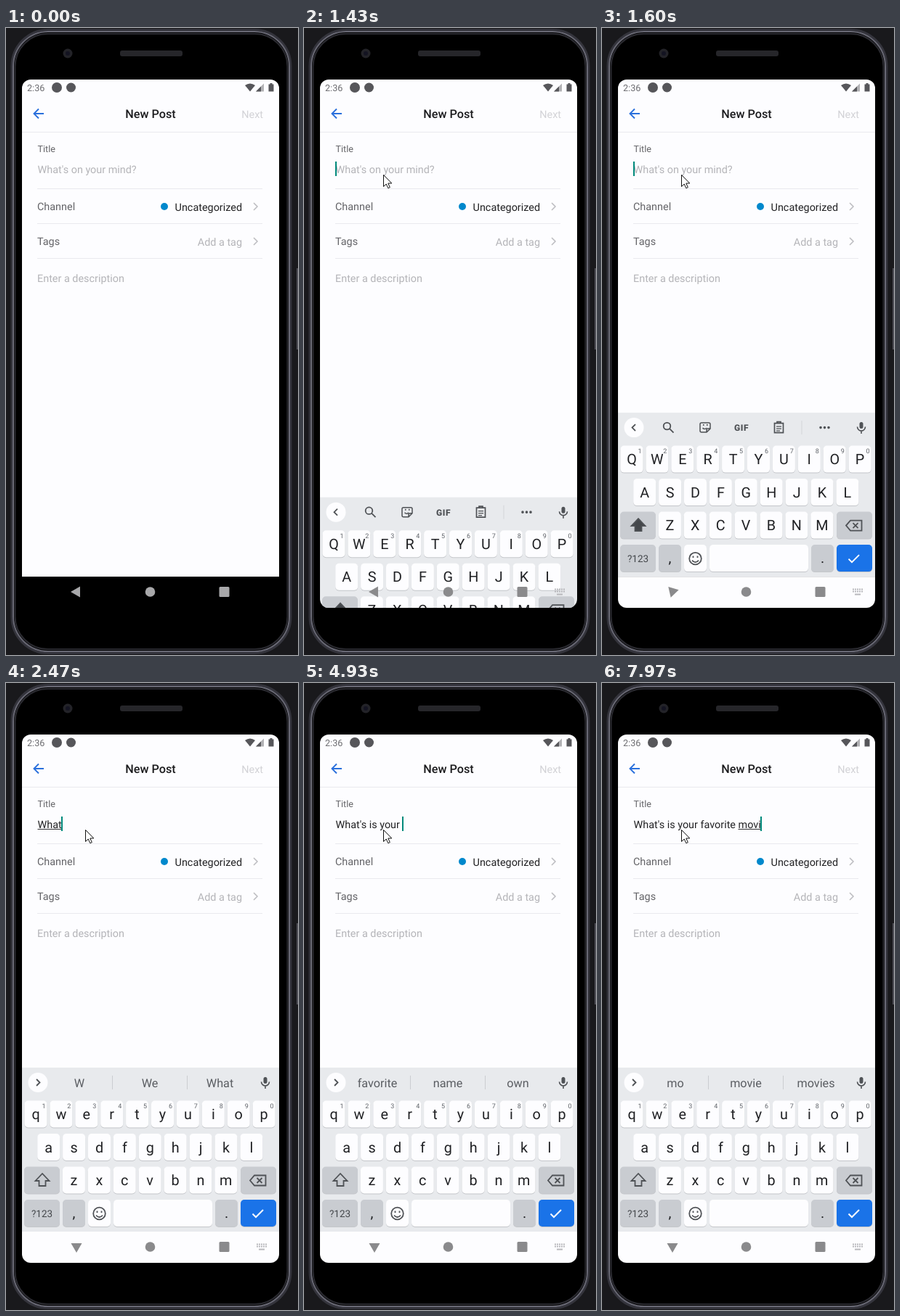
Recreate the animation shown at these times as an HTML page. Size 402x864 px, loop 8 s.

```html
<!DOCTYPE html>
<html lang="en">
<head>
<meta charset="utf-8">
<title>New Post</title>
<style>
  html, body { margin: 0; width: 100%; height: 100%; overflow: hidden; background: #19191c; }
  svg { display: block; width: 100%; height: 100%; font-family: Roboto, sans-serif; }
  text { white-space: pre; text-rendering: geometricPrecision; }
  .body { font-size: 14.4px; fill: #646468; }
  .dark { fill: #222224; }
  .pale { fill: #b4b4b8; }
  .end { text-anchor: end; }
  .mid { text-anchor: middle; }
  .line { fill: none; stroke: #4f5256; stroke-width: 1.8; }
  .letter { font-size: 19.8px; fill: #202124; text-anchor: middle; }
  .digit { font-size: 9px; fill: #5f6368; text-anchor: middle; }
  .guess { font-size: 16.2px; fill: #5a5d62; text-anchor: middle; }
</style>
</head>
<body>
<svg viewBox="0 0 402 864">
  <defs>
    <clipPath id="screen"><rect x="22" y="71" width="354" height="728" rx="12"/></clipPath>
  </defs>

  <!-- phone body -->
  <rect width="402" height="864" fill="#19191c"/>
  <rect x="400" y="331" width="2" height="112" fill="#4c4c54"/>
  <rect x="8" y="2.500" width="384" height="859" rx="50" fill="#000" stroke="#34343c" stroke-width="3"/>
  <rect x="10" y="5" width="380" height="854" rx="48" fill="none" stroke="#686874" stroke-width="2"/>
  <rect x="12.500" y="8" width="375" height="848" rx="45" fill="none" stroke="#2a2a30" stroke-width="2"/>
  <circle cx="85" cy="35" r="6.500" fill="#232328"/>
  <circle cx="85" cy="35" r="3" fill="#141422"/>
  <rect x="157" y="31" width="86" height="8" rx="3" fill="#26262a"/>

  <g clip-path="url(#screen)">
    <rect x="22" y="71" width="354" height="685" fill="#fdfdff"/>

    <!-- status bar -->
    <text x="29" y="86.500" font-size="12.600" fill="#6c6c70">2:36</text>
    <g fill="#56565a">
      <circle cx="70" cy="82" r="7"/>
      <circle cx="89.500" cy="82" r="6.500"/>
      <path d="M329 79q7-5 14 0l-7 8.500z"/>
      <path d="M355 76.500v11h-11z" opacity=".45"/>
      <path d="M351 80.500v7h-7z"/>
      <path d="M361.500 77.500h2v-1.500h3v1.500h2v10h-7z"/>
    </g>

    <!-- header -->
    <path d="M52 118H39M45 111.500l-6.500 6.500 6.500 6.500" fill="none" stroke="#2a70dc" stroke-width="1.900"/>
    <text class="mid" x="199" y="124" font-size="16.200" font-weight="500" fill="#1c1c1e">New Post</text>
    <text class="body end" x="354" y="123.500" style="fill:#d2d2d6">Next</text>
    <path d="M22 143.500H376M43 221.500H353M43 269.500H353M43 317.500H353" stroke="#e9e9ee"/>

    <!-- form -->
    <text x="43.500" y="171" font-size="12.600" fill="#646468">Title</text>
    <text id="title" class="body" x="43.500" y="200"></text>
    <path id="underline" stroke="#333336"/>
    <rect id="caret" y="184" width="2" height="20" fill="#00897b"/>
    <text class="body" x="43" y="251">Channel</text>
    <circle cx="218" cy="246" r="5" fill="#0088cc"/>
    <text class="body dark end" x="325" y="251.500">Uncategorized</text>
    <text class="body" x="43" y="299">Tags</text>
    <text class="body pale end" x="325" y="299.500">Add a tag</text>
    <path d="M341 241l5 5-5 5M341 289l5 5-5 5" fill="none" stroke="#bcbcc0" stroke-width="1.500"/>
    <text class="body pale" x="43" y="350">Enter a description</text>

    <!-- keyboard panel, slides up as one piece -->
    <g id="panel">
      <rect x="22" y="530" width="354" height="226" fill="#e8eaed"/>
      <rect x="22" y="756" width="354" height="44" fill="#fdfdff"/>
      <circle cx="44" cy="550.500" r="13.500" fill="#fdfdff"/>
      <path id="toggle" class="line"/>
      <g fill="#4f5256">
        <rect x="354.500" y="543" width="5" height="9" rx="2.500"/>
        <path d="M351.500 549.500a5.500 5.500 0 0 0 11 0M357 555v4" fill="none" stroke="#4f5256" stroke-width="1.600"/>
      </g>
      <g id="tools" class="line">
        <circle cx="89.500" cy="548.500" r="4.800"/><path d="M93 552l5.500 5.500"/>
        <path d="M137 544h10q2 0 2 2v6l-5 5h-7q-2 0-2-2v-9q0-2 2-2zM149 552h-3q-2 0-2 2v3M138.500 551q3 3 5.500 0" stroke-width="1.500"/>
        <path d="M139 547h1.500M144 547h1.500" stroke-width="2"/>
        <text class="mid" x="192" y="555" font-size="12" font-weight="900" letter-spacing=".6" fill="#4f5256" stroke="none">GIF</text>
        <path d="M237.500 544.500h12v13h-12zM241 544.500v-2h5v2" stroke-width="1.700"/>
        <path d="M240 549h7M240 552h7M240 555h5" stroke-width="1.400"/>
        <path d="M275 541v19" stroke="#d2d4d8" stroke-width="1"/>
        <path d="M301 550.500h.01M306.500 550.500h.01M312 550.500h.01" stroke-width="3.600" stroke-linecap="round"/>
      </g>
      <g id="guesses">
        <path d="M146.500 541v19M249.500 541v19" stroke="#cbcdd1"/>
        <text class="guess" x="101" y="556.500"></text>
        <text class="guess" x="198" y="556.500"></text>
        <text class="guess" x="294.500" y="556.500"></text>
      </g>
      <g id="keys"></g>
      <path id="shift" d="M50 676l-9.500 10h5v7h9v-7h5z" class="line"/>
      <path d="M342 678.500h15.500v14H342l-6-7zM345.500 682l7 7M352.500 682l-7 7" class="line" stroke-width="1.600"/>
      <text class="mid" x="49.500" y="736" font-size="13.500" fill="#44474b">?123</text>
      <text class="letter" x="93.500" y="737">,</text>
      <text class="letter" x="303.500" y="737">.</text>
      <circle cx="128.500" cy="731" r="8.300" class="line"/>
      <path d="M125.500 727.500v2.500M131.500 727.500v2.500M124 733.500q4.500 5 9 0" class="line"/>
      <path d="M339.500 731.500l4.500 4.500 10-10" fill="none" stroke="#fff" stroke-width="2"/>
    </g>
  </g>

  <!-- navigation -->
  <g id="nav">
    <path id="back" d="M89 777l13-7.500v15z"/>
    <circle cx="198.500" cy="777" r="6.800"/>
    <rect x="293.500" y="770" width="14" height="14" rx="1.500"/>
    <g id="imeIcon" fill="none" stroke-width="2">
      <path d="M345 773.500h14M345 776.500h14" stroke-dasharray="2 1"/>
      <path d="M348 780.500h8"/>
    </g>
  </g>

  <path id="pointer" d="M.5.5V16.500l3.700-3.500 2.600 5.700 2.500-1.100-2.500-5.600h5z" fill="#fff" stroke="#111" stroke-linejoin="round"/>
</svg>

<script>
const LOOP = 8000, TEXT_X = 43.5;
const el = id => document.getElementById(id);
const clamp = v => Math.max(0, Math.min(1, v));
const easeOut = p => 1 - (1 - clamp(p)) ** 3;
const show = (node, on) => node.setAttribute('visibility', on ? 'visible' : 'hidden');
const measure = document.createElement('canvas').getContext('2d');
measure.font = '14.4px Roboto, sans-serif';

// [time, text]; a trailing "|" marks text whose last word is committed
const typing = [
  [2000, 'W'], [2230, 'Wh'], [2370, 'Wha'], [2470, 'What'], [2670, "What'"],
  [2800, "What's"], [2930, "What's "], [3170, "What's |"],
  [3630, "What's i"], [3870, "What's is"], [4100, "What's is "], [4300, "What's is |"],
  [4330, "What's is y"], [4400, "What's is yo"], [4470, "What's is you"],
  [4570, "What's is your"], [4670, "What's is your "], [4930, "What's is your |"],
  [5470, "What's is your f"], [5670, "What's is your fa"], [5870, "What's is your fav"],
  [6130, "What's is your favo"], [6330, "What's is your favor"],
  [6470, "What's is your favori"], [6570, "What's is your favorit"],
  [6700, "What's is your favorite"], [6970, "What's is your favorite "],
  [7270, "What's is your favorite |"], [7370, "What's is your favorite m"],
  [7500, "What's is your favorite mo"], [7830, "What's is your favorite mov"],
  [7970, "What's is your favorite movi"]
];
const guesses = [
  [2070, 'W We What'], [2530, "What Whats What's"], [3170, 'the up your'],
  [3900, 'is us his'], [4300, 'the your a'], [4500, 'your you yours'],
  [4700, 'your you yourself'], [4930, 'favorite name own'], [5570, 'f for first'],
  [5930, 'fav favorite favour'], [6270, 'favo favorite favor'],
  [6630, 'favorit favorite favorites'], [7000, 'favorite favorites Favorite'],
  [7270, 'movie food thing'], [7570, 'm most movies'], [7870, 'mo movie movies']
];
const latest = (list, t) => {
  let value = '';
  for (const [time, v] of list) if (time <= t) value = v;
  return value;
};

function buildKeys() {
  const key = (x, y, w, fill) =>
    `<rect x="${x}" y="${y + 1}" width="${w}" height="37" rx="5" fill="#c4c6ca"/>` +
    `<rect x="${x}" y="${y}" width="${w}" height="37" rx="5" fill="${fill}"/>`;
  const light = '#fdfdff', gray = '#c9ccd1';
  const rows = [['qwertyuiop', 41, 575.5], ['asdfghjkl', 58.7, 621], ['zxcvbnm', 93.4, 666.5]];
  let out = '';
  for (const [letters, x0, y] of rows) {
    [...letters].forEach((c, i) => {
      const x = x0 + i * 34.9;
      out += key(x - 15.5, y, 31, light) + `<text class="letter key" x="${x}" y="${y + 25.5}">${c}</text>`;
      if (letters.length === 10) out += `<text class="digit" x="${x + 11}" y="${y + 10.5}">${(i + 1) % 10}</text>`;
    });
  }
  out += key(25, 666.5, 49, gray) + key(323, 666.5, 49, gray);
  const bottom = [[25, 49, gray], [78, 31, gray], [113, 31, light], [148, 136, light], [288, 31, gray], [323, 49, '#1a73e8']];
  for (const [x, w, fill] of bottom) out += key(x, 712, w, fill);
  el('keys').innerHTML = out;
}
buildKeys();
const letters = [...document.querySelectorAll('.key')];
const guessTexts = [...el('guesses').querySelectorAll('text')];

function drawTitle(t) {
  const entry = latest(typing, t);
  const committed = entry.endsWith('|');
  const text = entry.replace('|', '');
  const xAt = s => TEXT_X + measure.measureText(s).width;
  const title = el('title');
  title.textContent = text || "What's on your mind?";
  title.setAttribute('class', text ? 'body dark' : 'body pale');

  const word = text.trimEnd();
  const start = xAt(word.slice(0, word.lastIndexOf(' ') + 1));
  el('underline').setAttribute('d', `M${start} 201.5H${xAt(word)}`);
  show(el('underline'), text && !committed);
  el('caret').setAttribute('x', Math.floor(xAt(text)));
  show(el('caret'), (t >= 1270 && t < 1770) || t >= 2000);
}

function drawKeyboard(t) {
  const rise = easeOut((t - 1370) / 250);
  el('panel').setAttribute('transform', `translate(0 ${270 * (1 - rise)})`);
  show(el('panel'), t >= 1400);

  const lower = t >= 2000;
  for (const node of letters) {
    const c = node.textContent;
    node.textContent = lower ? c.toLowerCase() : c.toUpperCase();
  }
  el('shift').style.fill = lower ? 'none' : '#44474b';

  const words = latest(guesses, t);
  el('tools').style.display = words ? 'none' : '';
  el('guesses').style.display = words ? '' : 'none';
  el('toggle').setAttribute('d', words ? 'M42 546l4.5 4.5-4.5 4.5' : 'M46 546l-4.5 4.5 4.5 4.5');
  guessTexts.forEach((node, i) => node.textContent = words.split(' ')[i] || '');
}

function drawNav(t) {
  const turn = clamp((t - 1430) / 210);
  const up = t >= 1430;
  el('nav').setAttribute('fill', up ? '#8a8a8c' : '#a8a8aa');
  el('back').setAttribute('transform', `rotate(${-90 * turn} 97 777)`);
  el('imeIcon').setAttribute('stroke', up ? '#b8b8bc' : '#98989a');
  show(el('imeIcon'), t >= 1270);
}

function drawPointer(t) {
  const p = easeOut((t - 300) / 670);
  el('pointer').setAttribute('transform', `translate(${Math.round(24 + 85 * p)} ${Math.round(370 - 168 * p)})`);
  show(el('pointer'), t >= 300);
}

function frame() {
  const t = performance.now() % LOOP;
  drawTitle(t);
  drawKeyboard(t);
  drawNav(t);
  drawPointer(t);
  requestAnimationFrame(frame);
}
frame();
</script>
</body>
</html>
```
